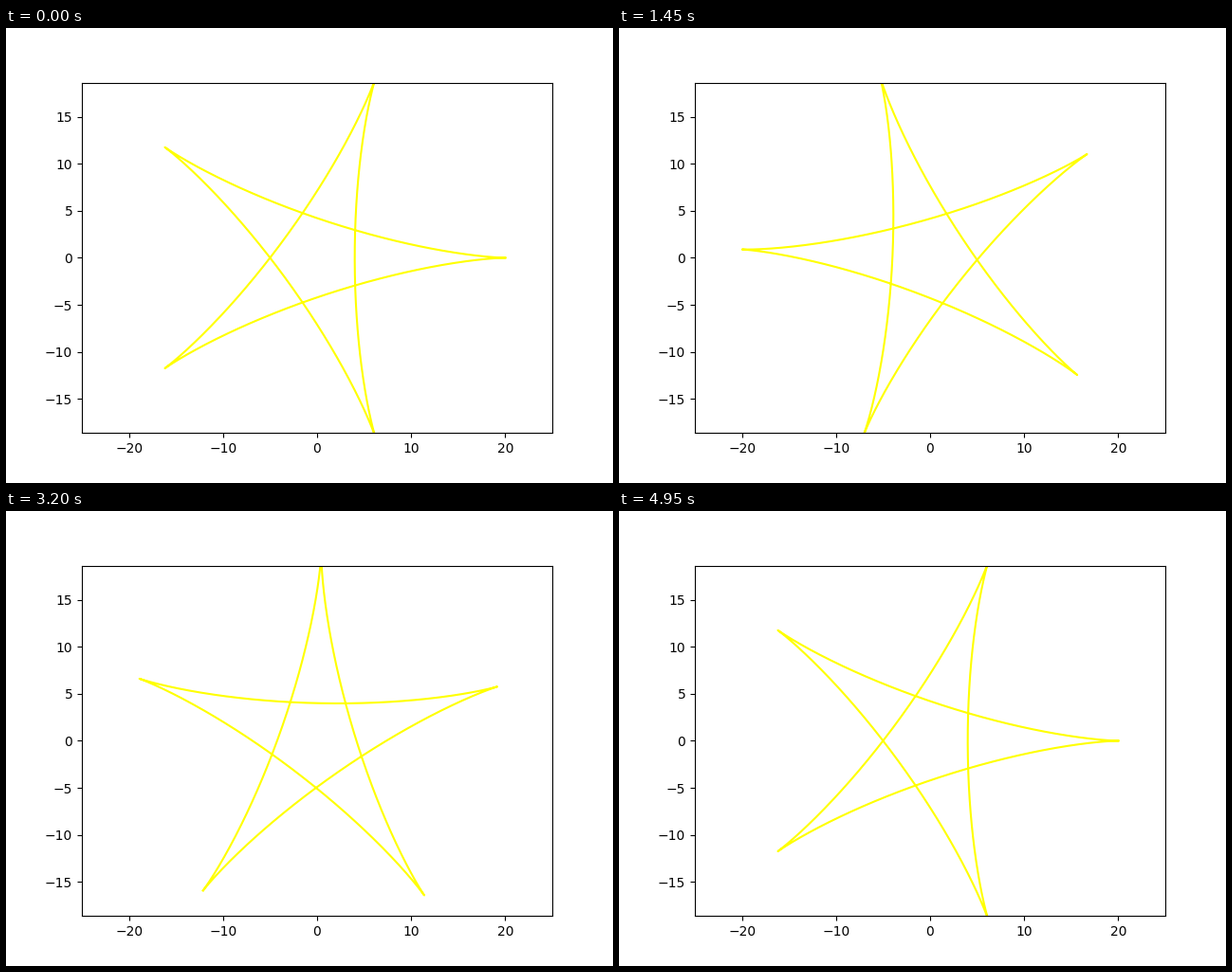
These frames come from a looping animation (640x480 px, 5 s). A matplotlib script:

```python
import numpy as np
import matplotlib.pyplot as plt
from matplotlib.animation import FuncAnimation

FRAMES = 100
INTERVAL = 50
HALF_WIDTH = 25

# Five-cusped hypocycloid, traced over two turns
t = np.linspace(0, 4 * np.pi, 1001)
star = 12 * np.exp(1j * t) + 8 * np.exp(-1.5j * t)
angles = np.linspace(0, 2 * np.pi, FRAMES)

fig, ax = plt.subplots(figsize=(6.4, 4.8), dpi=100)
fig.subplots_adjust(left=0.125, right=0.9, bottom=0.11, top=0.88)

# Equal scale on both axes
box = ax.get_window_extent()
half_height = HALF_WIDTH * box.height / box.width
ax.set_xlim(-HALF_WIDTH, HALF_WIDTH)
ax.set_ylim(-half_height, half_height)
ax.set_xticks(range(-20, 21, 10))
ax.set_yticks(range(-15, 16, 5))

line, = ax.plot(star.real, star.imag, color="yellow", lw=1.5)


def update(i):
    turned = star * np.exp(1j * angles[i])
    line.set_data(turned.real, turned.imag)
    return line,


anim = FuncAnimation(fig, update, frames=FRAMES, interval=INTERVAL,
                     repeat=True, repeat_delay=0)
plt.show()
```
